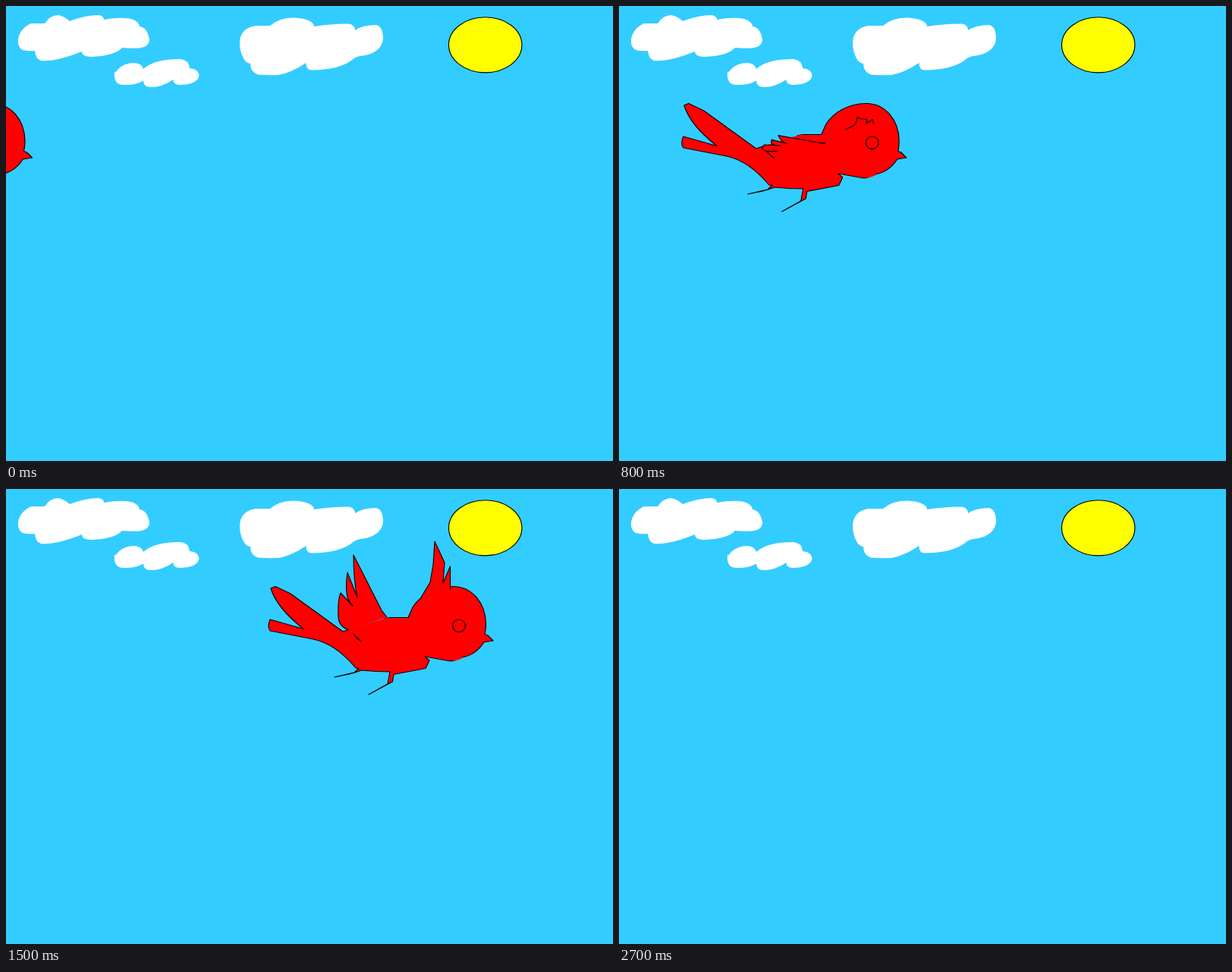
Recreate the animation shown at these times as an HTML page. Size 800 by 600 pixels, loop 2900 ms.

```html
<!DOCTYPE html>
<html lang="en">
<head>
<meta charset="utf-8">
<title>Red bird</title>
<style>
  html, body { margin: 0; width: 100%; height: 100%; overflow: hidden; background: #3cf; }
  svg { display: block; width: 800px; height: 600px; }
  .ink { stroke: #000; stroke-width: 1.15; stroke-linejoin: round; vector-effect: non-scaling-stroke; }
  #bird { fill: #f00; }
  .seam { stroke: #f00; stroke-width: 2.4; }
</style>
</head>
<body>
<svg viewBox="0 0 800 600">
  <rect width="800" height="600" fill="#3cf"/>
  <g fill="#fff">
    <path d="M16 44Q18 30 33 23L51 23Q58 12 69 12Q76 13 84 20Q105 12 122 12Q129 13 129 18Q150 14 165 17Q175 20 176 27Q186 28 189 44Q189 54 175 55.5Q165 56 153 55Q143 66 112 67Q100 67 100 60Q65 74 46 72Q39 70 38 59Q30 60 22 58Q15 54 16 44Z"/>
    <path d="M143 87Q146 87 147 84Q155 75 170 75Q179 76 181 83Q195 70 230 70Q241 71 242 82Q254 83 254.5 92Q252 104 228 104Q220 103 220.5 97Q206 107 191 107Q181 107 181 98.5Q172 104 157 104Q141 105 143 87Z"/>
    <path d="M308 48Q309 29 329 26L348 26Q360 15 380 15.5Q405 17 406 27Q430 23 452 23.5Q460 25 460 32Q470 25 488 25Q497 27 497 44Q494 63 467 66Q460 67 455 72Q438 84 404 84.5Q395 85 395.5 75Q376 88 359 91Q345 91.5 332 90.5Q322 87 322 76Q316 75 313 69Q308 60 308 48Z"/>
  </g>
  <ellipse class="ink" cx="631.7" cy="51.3" rx="48.2" ry="36.5" fill="#ff0"/>
  <g id="bird">
    <path class="ink" d="M336 171Q340 169.5 345 169.5L368 169.5L374 156C384 140 404 128.5 427 128.5C452 128.5 470 150 470.5 178Q470.5 185 469 191.5L473 193L480 200L468 202Q457 219 439 222L428 226Q425 227.5 421 226.5L390 221L396 226L391 236.5L349 244.5L347.5 254L316 271L341 257L344 241Q325 241 306 239Q298 243 271 248L297 242L303 236.5L299 236Q272 204 243 198L186 187Q182 182 186 172L230 184.5Q195 157 187 131L193 128.5L213 138L282 188L291 185"/>
    <path class="seam" d="M439 222L428 226M292 186L341 171"/>
    <path class="ink" d="M296 191Q300 197 306 201L298 194Z"/>
    <path id="rear" class="ink" d="M11 49Q-3 44 -3 31Q-4 9 0 0L16 17Q4 8 9 -27L22 6Q17 -17 17 -50L54 23L61 32"/>
    <path id="front" class="ink" d="M0 0L12 -20L16 -43L18 -74L31 -46L29 -19L38.5 -41L38.5 -11"/>
    <circle class="ink" cx="435" cy="180.3" r="8.3"/>
  </g>
</svg>
<script>
const LOOP = 2900, TICK = 100, STRIDE = 40.5, BEAT = 14;
const $ = id => document.getElementById(id);

// Matrices of each wing when raised, half way and lowered
const wings = [
  [$('rear'), [1, 0, 0, 1, 279, 137], [1.06, -.16, .06, .445, 283, 163], [1.237, -.142, .07, .25, 291, 179]],
  [$('front'), [1, 0, 0, 1, 385, 143], [1.008, -.107, .056, .46, 389, 154], [.963, -.148, .038, .228, 398, 161]]
];

function pose([el, ...keys], u) {
  const i = u < 1 ? 0 : 1;
  const m = keys[i].map((v, n) => v + (keys[i + 1][n] - v) * (u - i));
  el.setAttribute('transform', `matrix(${m})`);
}

// Strides flown: one is skipped at the start, then the bird slows to even it out
const strides = tick => tick && Math.max(tick, Math.min(tick + 1, 8.5));

// 0 raised, 1 half way, 2 lowered; a little beyond at the bottom of the beat
function flap(pos) {
  const step = Math.max(0, 6.5 - Math.abs(pos % BEAT - 7.5));
  return step < 3 ? step / 3 : (step - 1) / 2;
}

function draw(ms) {
  const pos = strides(Math.floor(ms % LOOP / TICK));
  $('bird').setAttribute('transform', `translate(${(pos - 11) * STRIDE} 0)`);
  for (const wing of wings) pose(wing, flap(pos));
}

const start = performance.now();
(function loop() {
  draw(performance.now() - start);
  requestAnimationFrame(loop);
})();
</script>
</body>
</html>
```
